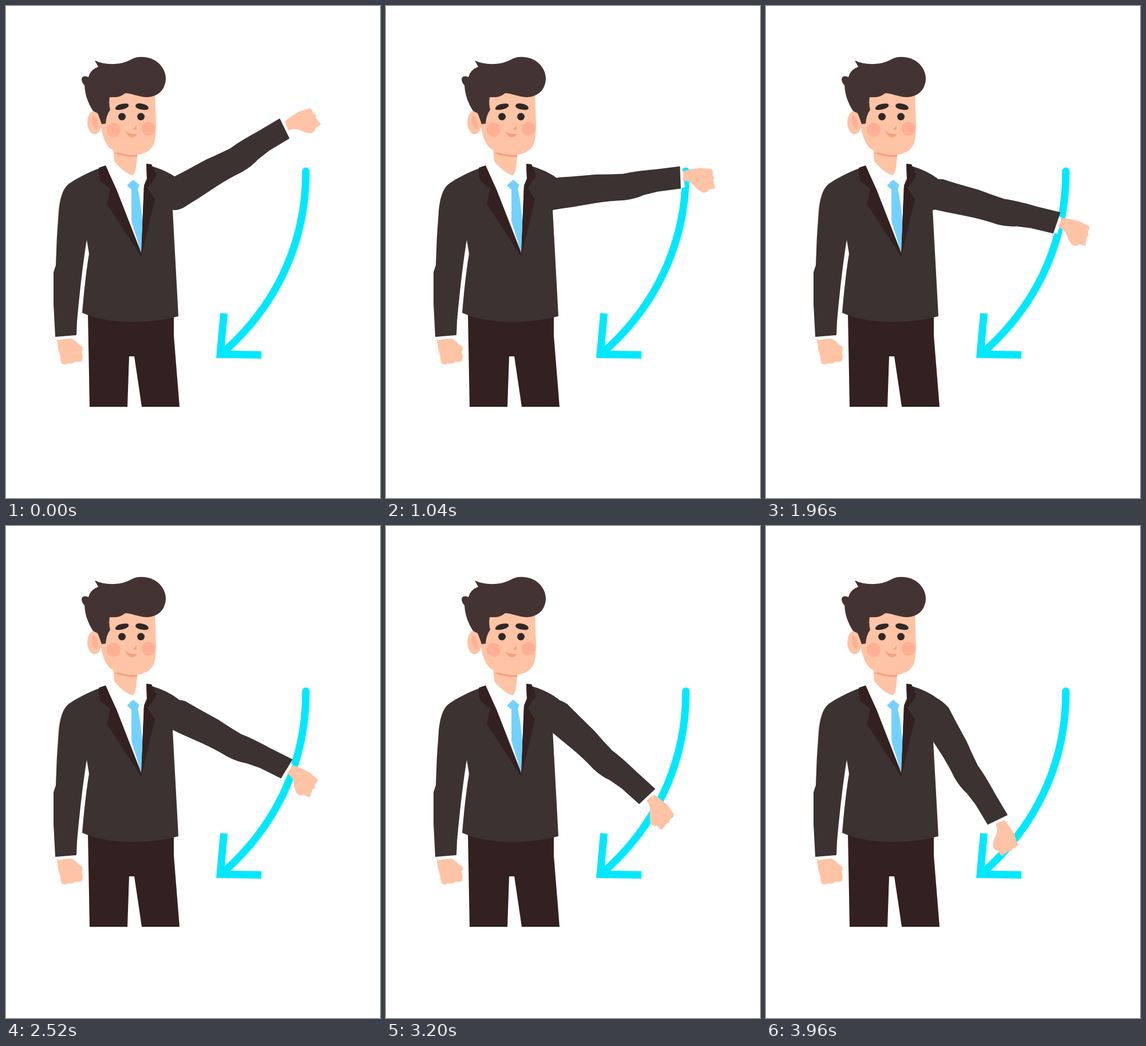
These frames come from a looping animation (653 px wide and 858 px high, 4000 ms). An HTML page:

```html
<!DOCTYPE html>
<html lang="en">
<head>
<meta charset="utf-8">
<title>Lowering arm</title>
<style>
html, body { margin: 0; width: 100%; height: 100%; overflow: hidden; background: #fff; }
svg { display: block; width: 100%; height: 100%; }
.suit { fill: #3b3231; }
.dark { fill: #322120; }
.skin { fill: #ffc3a5; }
.hair { fill: #443333; }
.ink { fill: #2f2827; }
.blush { fill: #ffb094; }
.line { fill: #f79f7e; }
.tie { fill: #73d1ff; }
.white { fill: #fff; }
.arrow { fill: none; stroke: #00e8ff; stroke-width: 13; }
</style>
</head>
<body>
<svg viewBox="0 0 653 858">
  <g class="arrow">
    <path stroke-linecap="round" d="M523.5 288C524 400 481 515 378 605"/>
    <path d="M380.5 536L374 607.300L446 608.500"/>
  </g>

  <g id="legs">
    <path class="dark" d="M143 536L293 536L293 575L303 699L237 699L224 611L215 611L212 699L146 699Z"/>
  </g>

  <g id="restingHand">
    <path class="skin" d="M88 578L91 583Q102 580 113 580Q119 581 126 589L134 595Q134 600 132 604L134 610L133 618Q130 622 121 620Q117 625 108 623Q102 627 97 623Q95 619 95 611Q91 601 90 589Z"/>
  </g>

  <g id="jacket">
    <path class="suit" d="M163 283C144 290 124 300 110 310C98 319 94 338 92 358Q88 405 87 452L83 464L83 520L86 577L123 574L124 550C128 505 134 450 141 408L145 432C140 462 136 500 133 535Q166 550 217 551Q264 551 301 541L291 356Q301 355 309 346L312 313Q305 304 291 295Q272 284 253 279Z"/>
    <path class="white" d="M174 278L187 270L229 270L245 275L246 301L241 313L236 432Z"/>
    <path class="dark" d="M162 282L174 278Q181 294 193 320L236 430L236 437L176 345L182 319L165 305Q161 294 162 282Z"/>
    <path class="dark" d="M245 275L254 276L262 294L261 299L247 317L260 337L236 437L236 430L241 313L246 302Z"/>
    <path class="tie" d="M211 313L222 303L233 312L230 319Q236 345 238 376L236 430L219 375L219 320Z"/>
  </g>

  <g id="head">
    <path class="skin" d="M187 250L230 250L228 274Q226 295 220 295Q213 293 204 286Q194 277 189 271Z"/>
    <path class="line" d="M190 256L229 256L229 263Q208 264 190 257Z"/>
    <path class="skin" d="M165 145L260 150L262 206Q262 232 257 243Q247 259 224 260Q201 260 183 249Q169 238 165 206Z"/>
    <ellipse class="skin" cx="154.500" cy="203" rx="12.500" ry="20.500"/>
    <path class="blush" d="M151 191Q160 193 161 215Q153 215 151 204Q149 196 151 191Z"/>
    <path class="hair" d="M132 127Q134 120 144 124Q147 111 161 106L155 95Q169 102 190 101Q207 100 219 93Q229 88 240 89C262 90 279 107 279 127C278 149 262 159 245 159C229 158 220 152 208 152Q201 158 192 159L181 159Q179 171 182 181Q175 190 174 205L167 206Q163 194 160 187L152 183C143 169 138 155 137 138Q132 134 132 127Z"/>
    <path class="ink" d="M191 178Q194 170 211 170Q215 171 214 175Q207 182 193 181Q190 180 191 178ZM226 175Q226 169 236 170Q248 172 249 178Q248 182 240 181Q228 180 226 175Z"/>
    <circle class="ink" cx="202.500" cy="193" r="6.500"/>
    <circle class="ink" cx="235.500" cy="193" r="6.500"/>
    <circle class="blush" cx="188" cy="216" r="12"/>
    <circle class="blush" cx="248.500" cy="214" r="12"/>
    <path class="line" d="M226 209Q229 211 228 215Q224 217 221 214Q226 214 226 209ZM208 218Q215 224 228 223Q228 228 220 229Q212 228 208 218Z"/>
  </g>

  <g id="arm">
    <path class="white" d="M481 203L485.500 200.500L500.500 226L494 231Z"/>
    <path class="skin" d="M487 201L499 192L512 184Q522 181 530 178.500Q535 179 536 187L541 190L541 195L549.500 206Q548 209 541 212Q539 221 532 222Q521 221 511 215.500Q502 213 493 217Z"/>
    <path class="suit" d="M275 318Q281 308 291 299L314 287L350 267.500Q372 258 392 248Q408 236 440 218.500L478 196L495 231L460 252L440 267.500Q430 279 413 289Q390 300 367 315L335 336L318 346.500Q305 356 294 356Q278 345 275 318Z"/>
  </g>
</svg>
<script>
const LOOP = 4000, STEP = 40, SWING = 90;
const SHOULDER = "296 322";
const arm = document.getElementById("arm");
const lastStep = LOOP / STEP - 1;

function draw(ms) {
  const step = Math.floor((ms % LOOP) / STEP);
  arm.setAttribute("transform", `rotate(${SWING * step / lastStep} ${SHOULDER})`);
}

function tick() {
  draw(performance.now());
  requestAnimationFrame(tick);
}
tick();
</script>
</body>
</html>
```
